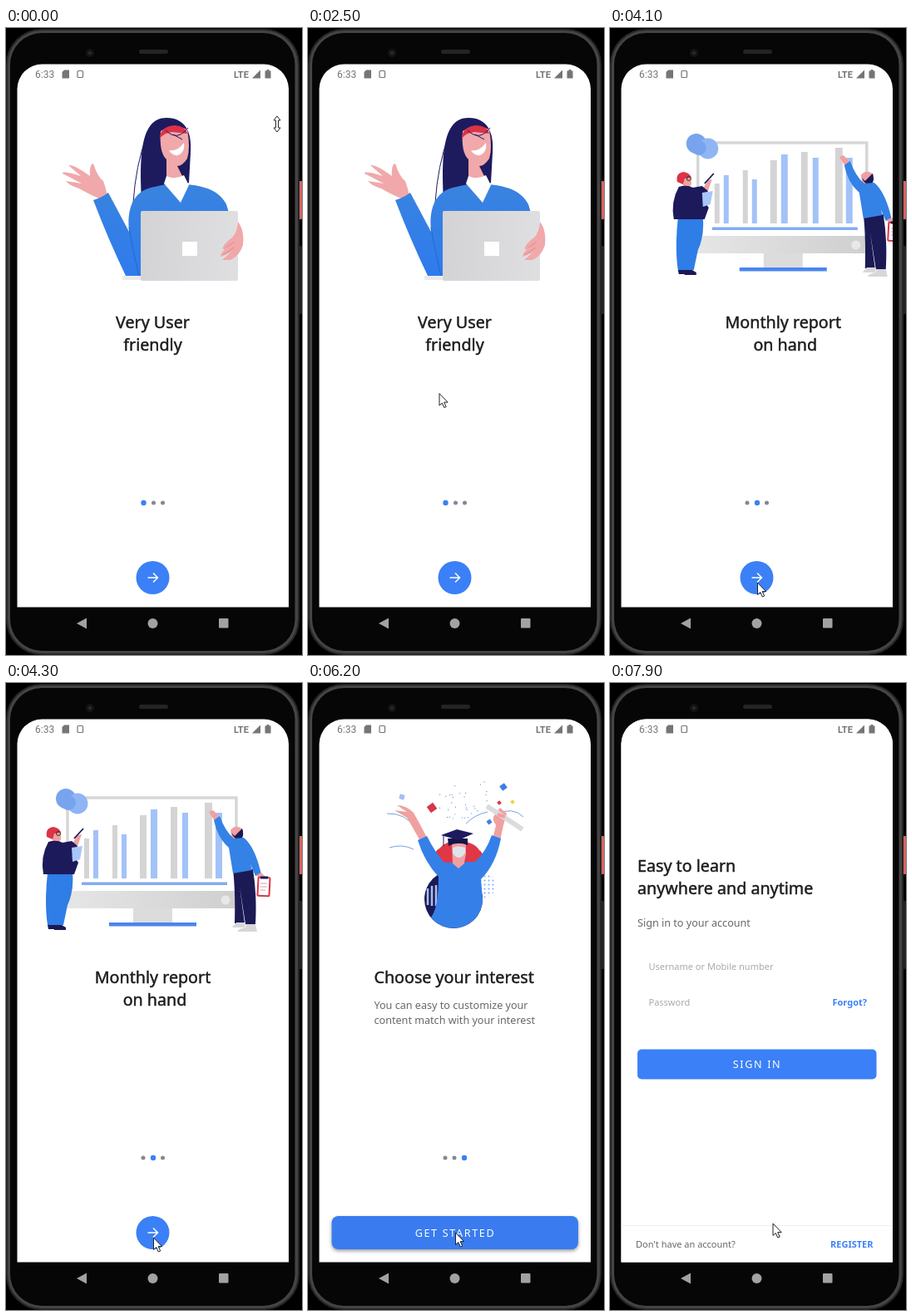
Write an HTML page that moves like this. It is 356 px wide and 754 px high and loops after 8 s.

```html
<!DOCTYPE html>
<html lang="en">
<head>
<meta charset="utf-8">
<title>Onboarding</title>
<style>
html, body { margin: 0; width: 100%; height: 100%; overflow: hidden; background: #000 }
svg { display: block; width: 356px; height: 754px; font-family: "Noto Sans", sans-serif }
.title { font-size: 19.7px; fill: #1c1c1e; stroke: #1c1c1e; stroke-width: .45 }
.body { font-size: 12.6px; fill: #68686c }
.small { font-size: 11px; fill: #68686c }
.hint { fill: #a9a9ad }
.link { fill: #3b80f6; font-weight: 600 }
.button { font-size: 12.6px; fill: #fff; letter-spacing: 1.65px; text-anchor: middle; font-weight: 500 }
.mid { text-anchor: middle }
.status { font: 12px Roboto, sans-serif; fill: #757575 }
</style>
</head>
<body>
<svg viewBox="0 0 356 754">
<defs>
  <clipPath id="screen"><path d="M13.500 696.500V73A30 30 0 0 1 43.500 43.500H310A30 30 0 0 1 340 73V696.500Z"/></clipPath>
  <clipPath id="wide"><rect x="28.500" y="641" width="296.500" height="40" rx="8"/></clipPath>
  <linearGradient id="metal"><stop stop-color="#d3d3d5"/><stop offset="1" stop-color="#dfdfe1"/></linearGradient>
  <linearGradient id="sweater" x2="0" y2="1"><stop stop-color="#3983df"/><stop offset="1" stop-color="#2f7bed"/></linearGradient>
  <linearGradient id="band"><stop stop-color="#e6e6e6"/><stop offset="1" stop-color="#cfcfcf"/></linearGradient>
  <pattern id="polka" width="5" height="5" patternUnits="userSpaceOnUse"><circle cx="2.500" cy="2.500" r="1.100" fill="#86aef5"/></pattern>
</defs>

<!-- phone -->
<rect x="351" y="184" width="5" height="46" rx="1" fill="#d9635f"/>
<rect x="351" y="262" width="5" height="82" rx="1" fill="#222"/>
<rect x="1" y="2" width="351" height="751" rx="42" fill="#444" stroke="#262626" stroke-width="2"/>
<rect x="5" y="6" width="342.500" height="743" rx="38" fill="#060606"/>
<circle cx="101" cy="30" r="5" fill="#141418"/><circle cx="101" cy="30" r="2" fill="#2a2a32"/>
<rect x="160" y="26" width="35" height="5" rx="2.500" fill="#242424"/>
<g fill="#a2a2a2"><path d="M85 716L97 709.500V722.500Z"/><circle cx="176.500" cy="716" r="6"/><rect x="256" y="710" width="11.500" height="11.500" rx="1"/></g>

<g clip-path="url(#screen)">
<rect x="13" y="43" width="327" height="654" fill="#fff"/>

<!-- page 1 -->
<g class="page">
  <rect x="140" y="298" width="25" height="5" rx="1" fill="#eaeaec"/>
  <path d="M163 205C161 160 160 108 193 108C216 108 224 126 222 150L220 186L190 208Z" fill="#1d1b5e"/>
  <path d="M169 130Q156 165 153 210" fill="none" stroke="#1d1b5e"/>
  <path d="M186 124Q200 114 218 122Q222 145 218 157Q212 166 206 166L214 182Q204 190 193 183V158Q184 150 186 124Z" fill="#f1a8aa"/>
  <path d="M185 131Q187 118 203 117Q216 118 218 127L200 125Q190 126 185 133Z" fill="#dc3347"/>
  <path d="M192 123Q206 137 219 120M201 128L212 134" fill="none" stroke="#1d1b5e"/>
  <path d="M196 147Q206 149 214 138Q216 149 207 153Q200 154 196 147Z" fill="#fff"/>
  <path d="M112 205Q98 199 88 193Q77 190 72 184L91 187L68 175Q67 171 90 178L75 165Q82 164 101 178Q100 164 105 163Q110 179 117 184Q120 192 122 202Z" fill="#f1a8aa"/>
  <path d="M105 207Q115 204 123 198L148 245C145 216 154 197 174 192L192 188H215Q254 190 265 212L268 222V298H144Q122 252 105 207Z" fill="url(#sweater)"/>
  <path d="M190 187L193 178Q203 183 214 177L220 189L210 210Z" fill="#fff"/>
  <path d="M148 240Q153 270 160 298" fill="none" stroke="#2468cc"/>
  <rect x="162" y="220" width="117" height="84" rx="2" fill="url(#metal)"/>
  <rect x="212" y="257" width="18" height="17" fill="#fff"/>
  <path d="M279 233Q287 243 285 261Q281 274 270 279H260L270 270L258 275Q258 270 267 263L260 266Q263 258 272 252Q278 246 279 233Z" fill="#f1a8aa"/>
  <path d="M261 273L274 264M262 266L275 257" stroke="#d97f86" stroke-width=".8"/>
  <g class="title mid"><text x="176.500" y="361">Very User</text><text x="176.500" y="388">friendly</text></g>
</g>

<!-- page 2 -->
<g class="page">
  <rect x="74" y="138" width="203" height="120" fill="#fff" stroke="#d6d6d6" stroke-width="3.500"/>
  <rect x="72" y="250" width="206" height="21" fill="url(#band)"/>
  <circle cx="264" cy="261" r="5.500" fill="#e8e8e8"/>
  <rect x="153" y="271" width="47" height="17" fill="#dcdcdc"/>
  <rect x="124" y="288" width="105" height="4.500" fill="#4a86ee"/>
  <rect x="91" y="239.500" width="175" height="3.500" fill="#84abf0"/>
  <g id="bars"></g>
  <circle cx="72" cy="139" r="12" fill="#78a4ee"/><circle cx="86" cy="145" r="12.500" fill="#8fb5f5"/><circle cx="75" cy="144" r="9" fill="#78a4ee"/>
  <path d="M50 228H80Q82 250 74 267L69 291H50Q46 265 50 228Z" fill="#2f7de6"/>
  <path d="M50 291H59L58 296H51ZM58 291H67L72 294V297H58Z" fill="#1b1a55"/>
  <path d="M56 178H66V188Q62 195 56 190Z" fill="#f0a0a0"/>
  <path d="M49 185Q47 174 57 173Q66 175 65 180L58 181L56 188Z" fill="#dc3347"/>
  <circle cx="63" cy="181" r="2.500" fill="none" stroke="#333"/>
  <path d="M79 195L86 183L91 182L85 199Z" fill="#f0a0a0"/>
  <path d="M82 187L93 175" stroke="#1b1a55" stroke-width="1.800"/>
  <path d="M51 191Q61 188 68 192L79 190L86 196L80 206L87 216L82 230H45Q41 209 51 191Z" fill="#1c1a5a"/>
  <path d="M79 198L92 196L89 212L80 215Z" fill="#a9c6f8"/>
  <path d="M273 224H297Q302 255 300 290H288L281 245L287 289H275Q276 250 273 224Z" fill="#1b1a55"/>
  <path d="M277 288H288L287 294H272ZM288 290H300L302 299H278Q280 295 288 294Z" fill="#d7d7d9"/>
  <path d="M270 177Q276 169 285 176L284 188H272Z" fill="#f0a0a0"/>
  <path d="M271 180L275 184L284 175Q287 182 283 188Q276 191 271 180Z" fill="#1b1a55"/>
  <path d="M244 155L249 153L256 160L251 166Z" fill="#f0a0a0"/>
  <path d="M250 165L257 160Q264 179 274 187L286 186Q298 196 305 222L307 230L300 232L294 218L296 225L273 229L268 198Q254 186 250 165Z" fill="#3482e6"/>
  <path d="M301 231L307 228L315 236L309 241Z" fill="#f0a0a0"/>
  <rect x="303" y="234" width="14" height="22" rx="1" fill="#fff" stroke="#d8384a" stroke-width="2" transform="rotate(3 310 245)"/>
  <path d="M306 241H314M306 245H314M306 249H312" stroke="#e79aa4"/>
  <path d="M306 234H315" stroke="#1b1a55" stroke-width="3"/>
  <g class="title mid"><text x="176.500" y="361">Monthly report</text><text x="179" y="388">on hand</text></g>
</g>

<!-- page 3 -->
<g class="page">
  <g id="confetti" fill="#7c9ce0"></g>
  <path d="M95 157Q117 156 130 175M98 198Q113 193 127 200M190 169Q201 158 216 155M226 158Q246 148 259 161" fill="none" stroke="#76a0df"/>
  <circle cx="211" cy="243" r="15" fill="url(#polka)"/>
  <circle cx="175" cy="260" r="35" fill="#1b1a55"/>
  <path d="M144 247V267M149 244V268M154 243V268" stroke="#a9c0ee" stroke-width="2.500"/>
  <path d="M152 218Q148 205 158 199Q165 190 181 190Q200 191 206 201Q214 207 208 217Z" fill="#df3746"/>
  <path d="M135 190Q125 172 119 162L104 153L119 155L107 147Q118 147 127 156Q135 170 143 186ZM222 188L226 171Q220 163 225 158L231 150L239 157L235 171L231 190Z" fill="#f0a0a0"/>
  <path d="M132 189L143 184Q153 204 164 216L201 215Q214 203 221 183L232 187Q226 218 208 236L210 260A35 35 0 0 1 148 282Q157 270 157 233Q140 215 132 189Z" fill="#3580e8"/>
  <path d="M173 193H190V206Q188 215 188 217L181 223L174 217Z" fill="#f0a0a0"/>
  <path d="M174 198Q181 195 189 198V204Q186 210 181 210Q176 209 174 204Z" fill="#dfe3ea"/>
  <path d="M168 187H192V195Q180 190 169 196Z" fill="#15144a"/>
  <path d="M160 183L179 176L199 181L181 189Z" fill="#1d1b5e"/>
  <path d="M163 183V196" stroke="#1d1b5e"/>
  <path d="M215 148L258 176" stroke="#dcdcde" stroke-width="6"/>
  <path d="M228 158L237 161" stroke="#f0a0a0" stroke-width="4"/>
  <text class="title" x="79.500" y="361">Choose your interest</text>
  <g class="body"><text x="79.500" y="392">You can easy to customize your</text><text x="79.500" y="410">content match with your interest</text></g>
</g>

<g id="dots"></g>
<g id="next">
  <circle cx="176.500" cy="661" r="20" fill="#3b80f6"/>
  <path d="M170.500 661H182M177 655.500L182.500 661L177 666.500" fill="none" stroke="#fff" stroke-width="1.500"/>
</g>
<g id="start">
  <rect x="28.500" y="641" width="296.500" height="40" rx="8" fill="#3a7cf0" style="filter:drop-shadow(0 2px 2px #0006)"/>
  <circle id="ripple" cx="185" cy="661" fill="#fff" opacity=".07" clip-path="url(#wide)"/>
  <text class="button" x="177" y="665.500">GET STARTED</text>
</g>

<g id="login">
  <rect x="13" y="43" width="327" height="654" fill="#fff"/>
  <g class="title"><text x="33" y="227">Easy to learn</text><text x="33" y="254">anywhere and anytime</text></g>
  <text class="body" x="33" y="293">Sign in to your account</text>
  <g class="small">
    <text class="hint" x="46.500" y="345">Username or Mobile number</text>
    <text class="hint" x="46.500" y="388">Password</text>
    <text class="link" x="267.500" y="388">Forgot?</text>
    <text x="31" y="679">Don't have an account?</text>
    <text class="link" x="265" y="679">REGISTER</text>
  </g>
  <rect x="33" y="440.500" width="287.500" height="36" rx="5" fill="#3b80f6"/>
  <text class="button" x="177" y="463">SIGN IN</text>
  <path d="M13 652.500H340" stroke="#efeff0"/>
</g>

<!-- status bar -->
<g class="status">
  <text x="35" y="60">6:33</text>
  <path d="M70 50.500H76V60.500H67.500V53Z"/>
  <rect x="86" y="51.500" width="6.500" height="8" rx="1" fill="none" stroke="#757575" stroke-width="1.200"/>
  <text x="274" y="59.500" style="font-size:11px;font-weight:700">LTE</text>
  <path d="M306 50.500V60.500H296Z"/>
  <path d="M311.500 51.500H313.500V50H316.500V51.500H318.500V60.500H311.500Z"/>
</g>
</g>

<path id="resize" d="M326 106L330 111H327.500V120H330L326 125L322 120H324.500V111H322Z" fill="#fff" stroke="#222"/>
<path id="arrow" d="M0 0V14.500L3.300 11.500L5.800 17L8.200 16L5.700 10.600H10.200Z" fill="#fff" stroke="#222"/>
</svg>

<script>
const LOOP = 8000, PAGE_WIDTH = 327;
const $ = id => document.getElementById(id);
const pages = [...document.querySelectorAll('.page')];
const clamp = v => Math.min(1, Math.max(0, v));
const show = (el, on) => el.style.display = on ? '' : 'none';

// CSS-style cubic Bézier easing, solved by bisection
function bezier(x1, y1, x2, y2) {
  const at = (a, b, s) => 3 * a * s * (1 - s) ** 2 + 3 * b * s * s * (1 - s) + s ** 3;
  return x => {
    let lo = 0, hi = 1;
    for (let i = 0; i < 22; i++) {
      const mid = (lo + hi) / 2;
      if (at(x1, x2, mid) < x) lo = mid; else hi = mid;
    }
    return at(y1, y2, lo);
  };
}
const ease = bezier(.25, .1, .25, 1);
const easeIn = bezier(.42, 0, 1, 1);
const fastOutSlowIn = bezier(.4, 0, .2, 1);

// x, top and width of each bar; colours alternate
$('bars').innerHTML = [
  [94, 187, 6], [105, 177, 6], [128, 171, 6], [139, 182, 6], [161, 159, 8],
  [174, 152, 8], [198, 149, 8], [212, 156, 7], [239, 144, 9], [252, 156, 8]
].map(([x, y, w], i) =>
  `<rect x="${x}" y="${y}" width="${w}" height="${235 - y}" fill="${i % 2 ? '#a3c2f8' : '#d4d4d4'}"/>`).join('');

let seed = 7;
const random = () => (seed = seed * 16807 % 2147483647) / 2147483647;
random();
let bits = '';
for (let i = 0; i < 32; i++)
  bits += `<circle cx="${155 + random() * 65}" cy="${116 + random() * 50}" r=".7"/>`;
[[113, 137, 6, '#a5bdf5'], [149, 150, 9, '#d83549'], [235, 125, 7, '#3c7de8'],
 [230, 144, 4, '#d83549'], [246, 143, 4, '#e3d64c'], [218, 167, 5, '#3c7de8']].forEach(([x, y, s, color], i) =>
  bits += `<rect x="${x - s / 2}" y="${y - s / 2}" width="${s}" height="${s}" fill="${color}" transform="rotate(${i ? -35 : 15} ${x} ${y})"/>`);
$('confetti').innerHTML = bits;

// time, x, y of the pointer tip
const pointer = [
  [0, 326, 107], [1000, 158, 439.5], [2700, 158, 439.5], [3600, 170, 663], [3800, 170, 663],
  [3950, 177.5, 667], [5200, 177.5, 667], [5300, 177.5, 661], [6200, 177.5, 661],
  [6600, 183.5, 660.5], [7700, 183.5, 660.5], [7900, 196, 650], [LOOP, 196, 650]
];
function pointerAt(t) {
  const i = pointer.findIndex(key => key[0] > t);
  const [t0, x0, y0] = pointer[i - 1], [t1, x1, y1] = pointer[i];
  const u = (t - t0) / (t1 - t0), k = u * u * (3 - 2 * u);
  return [x0 + (x1 - x0) * k, y0 + (y1 - y0) * k];
}

const dotX = [[165.5, 177.5, 188.5], [165, 177, 188.5], [165, 176, 188]];

function draw(t) {
  const position = ease(clamp((t - 3850) / 400)) + ease(clamp((t - 5396) / 400));
  const current = Math.round(position);
  pages.forEach((page, i) => {
    show(page, Math.abs(i - position) < 1);
    page.setAttribute('transform', `translate(${(i - position) * PAGE_WIDTH})`);
  });
  $('dots').innerHTML = dotX[current].map((x, i) =>
    `<circle cx="${x}" cy="571" r="${i === current ? 3.2 : 2.5}" fill="${i === current ? '#3b80f6' : '#858797'}"/>`).join('');
  show($('next'), current < 2);
  show($('start'), current === 2);
  $('ripple').setAttribute('r', t < 7000 ? 0 : 15 + Math.max(0, t - 7200) * .31);

  const entry = clamp((t - 7310) / 290);
  show($('login'), entry > 0);
  $('login').setAttribute('opacity', easeIn(entry));
  $('login').setAttribute('transform', `translate(0 ${(1 - fastOutSlowIn(entry)) * 163})`);

  show($('resize'), t < 100);
  show($('arrow'), t >= 100);
  $('arrow').setAttribute('transform', `translate(${pointerAt(t)})`);
}

function tick() {
  draw(performance.now() % LOOP);
  requestAnimationFrame(tick);
}
tick();
</script>
</body>
</html>
```
